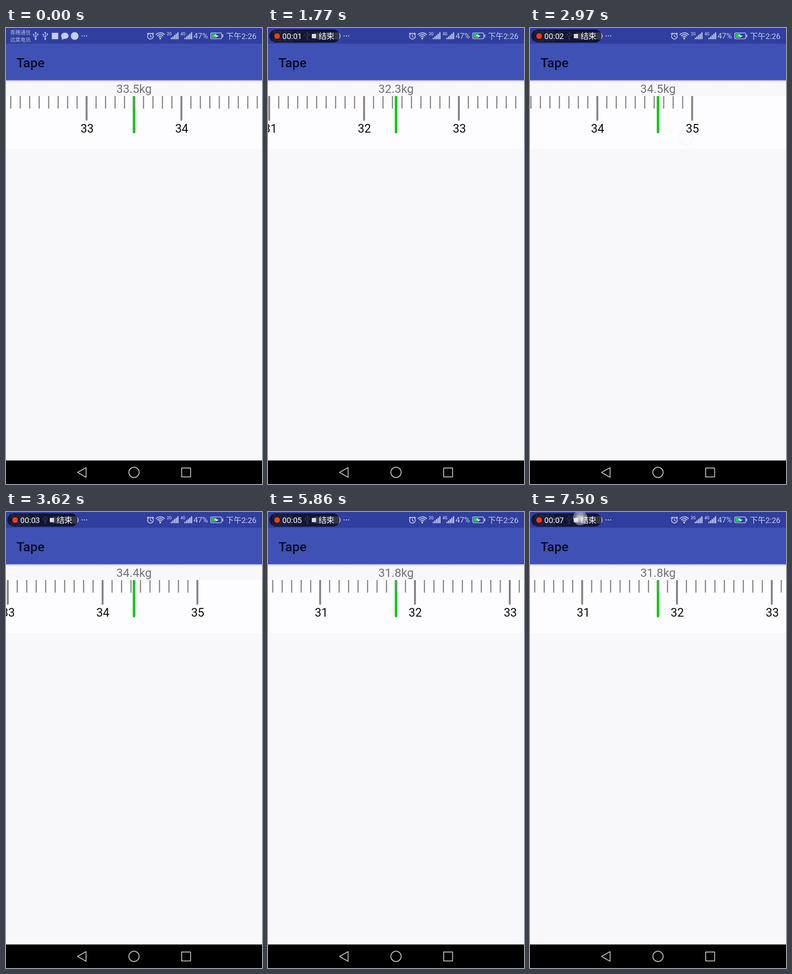
These frames come from a looping animation (561 px wide and 998 px high, 7540 ms). An HTML page with a canvas:

```html
<!DOCTYPE html>
<html lang="zh">
<head>
<meta charset="utf-8">
<title>Tape</title>
<style>
html, body { margin: 0; width: 100%; height: 100%; overflow: hidden; background: #f8f7fa; }
canvas { display: block; }
</style>
</head>
<body>
<canvas id="stage" width="561" height="998"></canvas>
<script>
const ctx = document.getElementById('stage').getContext('2d');
const LOOP = 7540, W = 561, H = 998;
const MID = W / 2, UNIT = 207.78, MAX = 35;
const SANS = 'Roboto, "Noto Sans CJK SC", "Noto Sans CJK", sans-serif';
const LIGHT = '#c6cbe8';

// time in ms, value in kg, speed in kg/s
const KEYS = [
  [90, 33.5, 0], [860, 34.914, 1], [1010, 35, 0], [1770, 32.337, 0],
  [2970, 34.638, 2], [3200, 35, 0], [4350, 32.8, 0], [4660, 32.8, 0],
  [5100, 34.4, 0], [5800, 31.8, 0]
];

function valueAt(t) {
  if (t <= KEYS[0][0]) return KEYS[0][1];
  const i = KEYS.findIndex(k => k[0] > t);
  if (i < 0) return KEYS[KEYS.length - 1][1];
  const [t0, v0, s0] = KEYS[i - 1], [t1, v1, s1] = KEYS[i];
  const d = (t1 - t0) / 1000, u = (t - t0) / (t1 - t0), w = 1 - u;
  return w * w * ((1 + 2 * u) * v0 + u * d * s0) + u * u * ((3 - 2 * u) * v1 - w * d * s1);
}

function rect(x, y, w, h, color) {
  ctx.fillStyle = color;
  ctx.fillRect(x, y, w, h);
}

function disc(x, y, r, color) {
  ctx.fillStyle = color;
  ctx.beginPath();
  ctx.arc(x, y, r, 0, Math.PI * 2);
  ctx.fill();
}

function ring(x, y, r, color, width) {
  ctx.strokeStyle = color;
  ctx.lineWidth = width;
  ctx.beginPath();
  ctx.arc(x, y, r, 0, Math.PI * 2);
  ctx.stroke();
}

function path(points, color, width, close) {
  ctx.strokeStyle = color;
  ctx.lineWidth = width;
  ctx.lineJoin = 'round';
  ctx.beginPath();
  points.forEach(([x, y]) => ctx.lineTo(x, y));
  if (close) ctx.closePath();
  ctx.stroke();
}

function text(str, x, y, size, color, align = 'left', weight = 400) {
  ctx.font = `${weight} ${size}px ${SANS}`;
  ctx.textAlign = align;
  ctx.fillStyle = color;
  ctx.fillText(str, x, y);
}

function usb(x) {
  path([[x, 10], [x, 24]], LIGHT, 1.4);
  path([[x - 4.5, 14], [x - 4.5, 17], [x, 21]], LIGHT, 1.2);
  path([[x + 4.5, 13], [x + 4.5, 16], [x, 19]], LIGHT, 1.2);
  disc(x, 24, 1.9, LIGHT);
  disc(x, 10.5, 1.8, LIGHT);
  disc(x - 4.5, 14, 1.5, LIGHT);
  rect(x + 3.2, 12, 2.6, 2.6, LIGHT);
}

function signal(x, label) {
  text(label, x, 16, 8.5, LIGHT, 'left', 500);
  for (let i = 0; i < 5; i++) {
    const h = 3 + i * 3;
    rect(x + 8.5 + i * 3.6, 24.5 - h, 2.6, h, LIGHT);
  }
}

function battery() {
  ctx.strokeStyle = LIGHT;
  ctx.lineWidth = 1.4;
  ctx.beginPath();
  ctx.roundRect(448.5, 10.8, 24, 12.8, 2.5);
  ctx.stroke();
  rect(474, 14, 2, 6.5, LIGHT);
  rect(450.3, 12.6, 10.5, 9.2, '#20c45a');
  ctx.fillStyle = '#eef2ff';
  ctx.beginPath();
  [[455, 17], [461, 13.5], [460.5, 16], [466, 17], [460, 21], [460.5, 18.3]]
    .forEach(([x, y]) => ctx.lineTo(x, y));
  ctx.fill();
}

function statusBar() {
  rect(0, 0, W, 34.3, '#303f9f');
  text('青穗通信', 9, 14, 11.3, '#b3bae0');
  text('远棠电讯', 9, 30, 11.3, '#b3bae0');
  usb(65);
  usb(86);
  rect(100.5, 10.5, 14, 14, LIGHT);

  ctx.fillStyle = LIGHT;
  ctx.beginPath();
  ctx.ellipse(129, 17, 8.3, 6.8, 0, 0, Math.PI * 2);
  ctx.fill();
  ctx.beginPath();
  ctx.moveTo(122, 19);
  ctx.lineTo(122.5, 26);
  ctx.lineTo(128, 23);
  ctx.fill();
  disc(150.5, 17.5, 8.5, LIGHT);
  for (let i = 0; i < 3; i++) disc(166.8 + i * 5, 17.3, 1.2, LIGHT);

  ring(316.5, 18, 6.3, LIGHT, 1.7);
  path([[316.5, 14], [316.5, 18.5], [319.5, 20]], LIGHT, 1.4);
  path([[309, 13.5], [312.5, 10.5]], LIGHT, 1.8);
  path([[320.5, 10.5], [324, 13.5]], LIGHT, 1.8);

  for (const r of [5, 9, 13]) {
    ctx.strokeStyle = LIGHT;
    ctx.lineWidth = 1.8;
    ctx.beginPath();
    ctx.arc(338, 23.5, r, -Math.PI * 0.77, -Math.PI * 0.23);
    ctx.stroke();
  }
  disc(338, 23, 2, LIGHT);

  signal(352.5, '2G');
  signal(382.5, '4G');
  text('47%', 411, 23.3, 17, LIGHT);
  battery();
  text('下午2:26', 482, 24, 17, LIGHT);
}

function recorder(t) {
  ctx.fillStyle = 'rgba(8, 10, 22, 0.77)';
  ctx.beginPath();
  ctx.roundRect(3, 3, 154, 29, 14.5);
  ctx.fill();
  disc(20, 17.7, 6.2, '#ff3a12');
  text('00:0' + Math.floor(t / 1000), 31.3, 24, 17.3, '#fff');
  rect(96, 13, 9.3, 9.3, '#dcdcdc');
  text('结束', 111, 24, 17.2, '#fff');
}

function appBar() {
  rect(0, 34, W, 80.3, '#3f51b5');
  const shade = ctx.createLinearGradient(0, 114, 0, 119);
  shade.addColorStop(0, 'rgba(70, 70, 110, 0.32)');
  shade.addColorStop(1, 'rgba(70, 70, 110, 0)');
  rect(0, 114.3, W, 4.7, shade);
  text('Tape', 22.9, 86, 28.4, '#0a0d22', 'left', 500);
}

function tick(x, bottom, width, color) {
  ctx.lineCap = 'round';
  path([[x, 140], [x, bottom - width / 2]], color, width);
  ctx.lineCap = 'butt';
}

// starts half the ink width left of the tick
function label(n, x) {
  ctx.font = `25.6px ${SANS}`;
  ctx.textAlign = 'left';
  const box = ctx.measureText(n);
  const ink = box.actualBoundingBoxLeft + box.actualBoundingBoxRight;
  text(n, x - ink / 2, 229.3, 25.6, '#0c0c0c');
}

function ticks(value) {
  const first = Math.floor((value - 1.5) * 10);
  const last = Math.min(MAX * 10, first + 31);
  for (let n = first; n <= last; n++) {
    const x = MID + (n / 10 - value) * UNIT;
    const major = n % 10 === 0;
    tick(x, major ? 203 : 176.5, major ? 4.2 : 2.5, '#878385');
    if (major) label(n / 10, x);
  }
}

function ruler(t) {
  rect(0, 149, W, 115.5, '#fdfcfe');
  ctx.save();
  ctx.beginPath();
  ctx.rect(0, 149, W, 115.5);
  ctx.clip();
  tick(MID, 230.5, 5.4, '#0bca14');
  ticks(valueAt(t));
  ctx.restore();

  // the readout trails the scale by one redraw
  const shown = Math.floor(valueAt(t - 40) * 10 + 0.001) / 10;
  text(shown.toFixed(1) + 'kg', MID, 142, 25.7, '#747274', 'center');
}

function fade(t, start, end, time) {
  return Math.max(0, Math.min(1, (t - start) / time + 1, (end - t) / time));
}

// finger that holds the scale while dragging
function drag(t, start, end, x, y, anchor) {
  const a = fade(t, start, end, 80);
  if (!a) return;
  ctx.globalAlpha = a;
  const fx = x - (valueAt(t) - valueAt(anchor)) * UNIT;
  disc(fx, y, 15.5, 'rgba(255, 255, 255, 0.3)');
  ring(fx, y, 15.8, '#cfcbea', 2);
  ctx.globalAlpha = 1;
}

function stopTap(t) {
  const a = Math.max(0, Math.min(1, (t - 7380) / 100));
  if (!a) return;
  ctx.globalAlpha = a;
  const glow = ctx.createRadialGradient(110, 13, 3, 110, 13, 16);
  glow.addColorStop(0, 'rgba(255, 255, 255, 0.75)');
  glow.addColorStop(0.65, 'rgba(235, 235, 245, 0.5)');
  glow.addColorStop(1, 'rgba(220, 220, 240, 0.12)');
  disc(110, 13, 16, glow);
  ring(110, 13, 15, 'rgba(215, 215, 235, 0.4)', 1.5);
  ctx.globalAlpha = 1;
}

function navBar() {
  const c = '#b9b9b9';
  rect(0, 946.5, W, H - 946.5, '#000');
  path([[156.8, 972.7], [175.5, 962.2], [175.5, 983.3]], c, 2, true);
  ring(280.5, 972.5, 11.3, c, 2);
  ctx.strokeRect(385, 963, 19.5, 19.5);
}

function draw(t) {
  rect(0, 0, W, H, '#f8f7fa');
  ruler(t);
  appBar();
  statusBar();
  if (t >= 90) recorder(t);
  drag(t, 2560, 2982, 342, 240, 2970);
  drag(t, 4660, 5060, 426, 190, 4660);
  stopTap(t);
  navBar();
}

const begin = performance.now();
function loop() {
  draw((performance.now() - begin) % LOOP);
  requestAnimationFrame(loop);
}
loop();
</script>
</body>
</html>
```
